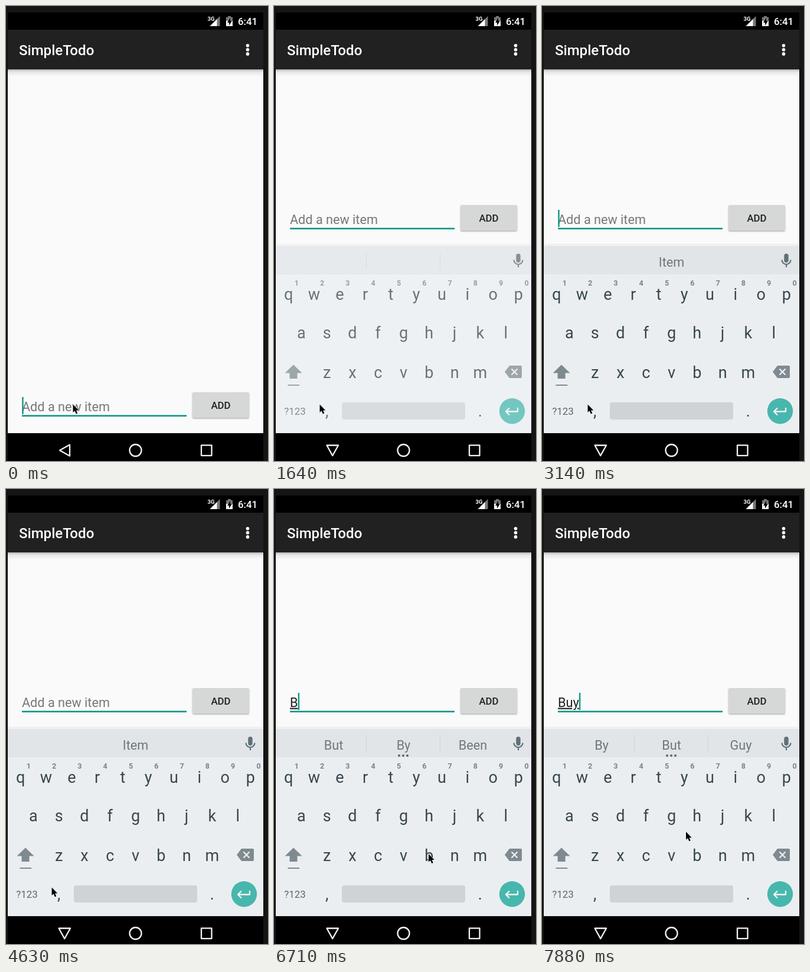
Animation of 444x768 px, one loop 8 s. Source, as an HTML page:

```html
<!DOCTYPE html>
<html lang="en">
<head>
<meta charset="utf-8">
<title>Todo list</title>
<style>
html, body { margin: 0; width: 100%; height: 100%; overflow: hidden; background: #151515; }
svg { display: block; width: 100%; height: 100%; }
text { font-family: Roboto, "Noto Sans", sans-serif; }
.bold { font-weight: 500; }
.mid { text-anchor: middle; }
.field { font-size: 21.65px; }
.key { font-size: 27px; fill: #37474f; }
.digit { font-size: 12.5px; font-weight: 700; fill: #78838a; }
.word { font-size: 21.65px; fill: #6c787e; }
.line { fill: none; stroke: #f4f4f4; stroke-width: 2.3; stroke-linejoin: round; }
#typed { fill: #212121; text-decoration: underline; }
</style>
</head>
<body>
<svg viewBox="0 0 444 768">
  <defs>
    <linearGradient id="drop" x2="0" y2="1">
      <stop stop-color="#000" stop-opacity=".26"/>
      <stop offset=".35" stop-color="#000" stop-opacity=".08"/>
      <stop offset="1" stop-color="#000" stop-opacity="0"/>
    </linearGradient>
    <filter id="soft" x="-10%" y="-10%" width="120%" height="130%">
      <feDropShadow dx="0" dy="1.4" stdDeviation="1.3" flood-opacity=".32"/>
    </filter>
  </defs>
  <rect width="444" height="768" fill="#151515"/>
  <rect x="3" y="11" width="433" height="757"/>
  <rect x="3" y="40" width="433" height="67" fill="#212121"/>
  <rect x="3" y="107" width="433" height="614" fill="#fafafa"/>
  <rect x="3" y="107" width="433" height="12" fill="url(#drop)"/>

  <g fill="#fff">
    <text class="bold" x="22" y="82.5" font-size="24.06">SimpleTodo</text>
    <text class="bold" x="393" y="32" font-size="16.84">6:41</text>
    <text x="341.5" y="25" font-size="9.5" font-weight="700">3G</text>
    <path d="M345.5 34L362.5 17V34Z" fill="#777"/>
    <path d="M345.5 34L357.5 22V34Z"/>
    <path d="M373 19H376V17H381V19H384V34H373Z" fill="#777"/>
    <path d="M373 25H384V34H373Z"/>
    <path d="M380 20L375 28H378V33L383 25H380Z" fill="#000"/>
    <circle cx="409.5" cy="66.7" r="2.8"/>
    <circle cx="409.5" cy="73.8" r="2.8"/>
    <circle cx="409.5" cy="80.9" r="2.8"/>
  </g>

  <g id="form">
    <text id="hint" class="field" x="27" y="683.5" fill="#777">Add a new item</text>
    <text id="typed" class="field" x="27" y="683.5"></text>
    <rect x="27" y="690.4" width="279" height="2.6" fill="#109686"/>
    <rect id="caret" y="660" width="2.4" height="29" fill="#109686"/>
    <rect x="316" y="652" width="96" height="43" rx="2" fill="#d6d7d7" filter="url(#soft)"/>
    <text class="bold mid" x="364" y="680" font-size="16.84" fill="#212121">ADD</text>
  </g>

  <g id="keyboard">
    <rect x="3" y="401" width="433" height="5" fill="#f0f1f1"/>
    <rect x="3" y="405" width="433" height="316" fill="#ebeef1"/>
    <rect x="3" y="405" width="433" height="48" fill="#e1e5e8"/>
    <path id="dividers" d="M156.5 416V445M281.5 416V445" stroke="#cdd3d7"/>
    <g id="words"></g>
    <g id="dots" fill="#58666d">
      <circle cx="212" cy="450" r="2"/><circle cx="219" cy="450" r="2"/><circle cx="226" cy="450" r="2"/>
    </g>
    <rect x="410.3" y="418" width="7.4" height="15" rx="3.7" fill="#607078"/>
    <path d="M406.5 428.5a7.5 7.5 0 0 0 15 0M414 436V441" fill="none" stroke="#607078" stroke-width="2.2"/>
    <g id="keys"></g>
    <path id="shift" d="M33 605.5L47.5 619.5H39.5V629H26.5V619.5H18.5Z"/>
    <rect x="23.5" y="639" width="19.5" height="2" fill="#7f8a90"/>
    <path d="M391 617.5L399 607H418a2 2 0 0 1 2 2V626a2 2 0 0 1 -2 2H399Z" fill="#7f8a90"/>
    <path d="M402.5 612.5L412.5 622.5M412.5 612.5L402.5 622.5" stroke="#ebeef1" stroke-width="2.4"/>
    <text class="mid" x="35.5" y="690" font-size="16.84" fill="#58666d">?123</text>
    <text class="key mid" x="89.6" y="693">,</text>
    <text class="key mid" x="349.3" y="693">.</text>
    <rect x="115" y="669" width="209" height="29" rx="4" fill="#cfd3d6"/>
    <circle cx="403.5" cy="683.7" r="21.7" fill="#47b7ad"/>
    <path class="line" d="M413 678V684.5H393M399 678.5L393 684.5L399 690.5"/>
  </g>

  <path id="back" class="line"/>
  <circle class="line" cx="219.5" cy="750" r="10"/>
  <rect class="line" x="331" y="741.3" width="17.5" height="17.5"/>
  <path id="pointer" d="M0 0V13.6L3.1 10.8L5.3 16L7.7 15L5.6 9.9H9.8Z" stroke="#fff" stroke-width="1" paint-order="stroke"/>
</svg>
<script>
const LOOP = 8000;
const $ = id => document.getElementById(id);

function addText(parent, x, y, content, className) {
  const node = document.createElementNS("http://www.w3.org/2000/svg", "text");
  node.setAttribute("x", x);
  node.setAttribute("y", y);
  node.setAttribute("class", className + " mid");
  node.textContent = content;
  return parent.appendChild(node);
}

// Keyboard layout
const PITCH = 43.3;
const letters = [];
[["qwertyuiop", 24.7, 495.5], ["asdfghjkl", 46.3, 561.3], ["zxcvbnm", 89.6, 627.5]]
  .forEach(([row, left, y]) => [...row].forEach((c, i) =>
    letters.push(addText($("keys"), left + i * PITCH, y, c, "key"))));
[..."1234567890"].forEach((c, i) => addText($("keys"), 38.3 + i * PITCH, 472, c, "digit"));
const words = [101, 219.5, 337].map(x => addText($("words"), x, 439.5, "", "word"));

// Each track is a list of [start time, value]; a value holds until the next start.
const pointerTrack = [
  [0, [113.5, 672.5]], [1050, [108, 672.5]], [1200, [95, 672.5]], [1340, [82, 672.5]], [1490, [77.5, 672.5]],
  [4930, [66, 658]], [5080, [44, 635]], [5220, [33, 620]], [5660, [50, 625]], [5810, [77, 632]], [5960, [91.5, 633.5]],
  [6110, [112, 632]], [6260, [165, 626]], [6410, [228, 619]], [6550, [262, 616]], [6850, [275, 556]], [7000, [285, 510.5]],
  [7290, [262, 500]], [7440, [243, 492]], [7730, [244, 540]], [7880, [244, 578.5]]
];
const caretTrack = [
  [0, true], [600, false], [1050, true], [1490, false], [2090, true], [2540, false], [3140, true],
  [3590, false], [4030, true], [4630, false], [5080, true], [5520, false], [6110, true]
];
const keyboardTrack = [[0, 0], [1640, 0.75], [1790, 1]];
const capsTrack = [[0, false], [5370, true], [6700, false]];
const typedTrack = [[0, ""], [6700, "B"], [7150, "Bu"], [7590, "Buy"]];
const wordTrack = [
  [0, ["", "", ""]], [1940, ["", "Item", ""]], [6700, ["But", "By", "Been"]],
  [7150, ["But", "Buy", "Bus"]], [7590, ["By", "But", "Guy"]]
];

function valueAt(track, time) {
  let value = track[0][1];
  for (const [start, next] of track) if (time >= start) value = next;
  return value;
}

function show(id, visible) {
  $(id).style.display = visible ? "" : "none";
}

function render(time) {
  const open = valueAt(keyboardTrack, time);
  const caps = valueAt(capsTrack, time);
  const typed = valueAt(typedTrack, time);
  const suggestions = valueAt(wordTrack, time);

  $("keyboard").style.opacity = open;
  $("form").setAttribute("transform", `translate(0 ${open ? -316 : 0})`);
  $("back").setAttribute("d", open ? "M89.5 741.5H109L99.2 759Z" : "M91 750L108 740.5V759.5Z");

  letters.forEach(node => {
    const c = node.textContent;
    node.textContent = caps ? c.toUpperCase() : c.toLowerCase();
  });
  $("shift").setAttribute("fill", caps ? "#47b7ad" : "#7f8a90");
  words.forEach((node, i) => node.textContent = suggestions[i]);
  show("dividers", suggestions[0] || !suggestions[1]);
  show("dots", typed);

  $("typed").textContent = typed;
  show("hint", !typed);
  show("caret", valueAt(caretTrack, time));
  const advance = typed ? $("typed").getComputedTextLength() : 0;
  $("caret").setAttribute("x", 27.2 + advance);
  $("pointer").setAttribute("transform", `translate(${valueAt(pointerTrack, time)})`);
}

const begin = performance.now();
function tick() {
  render((performance.now() - begin) % LOOP);
  requestAnimationFrame(tick);
}
tick();
</script>
</body>
</html>
```
